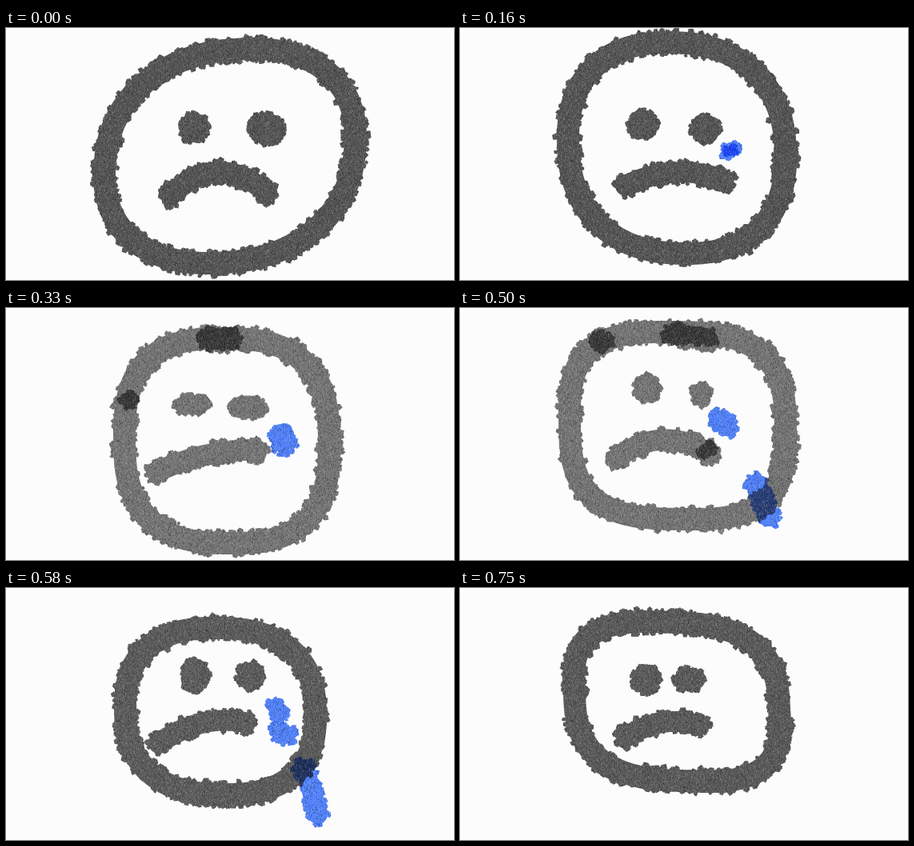
An HTML page with a canvas for the animation above (830 ms loop, 560 by 315 pixels).

```html
<!DOCTYPE html>
<html lang="en">
<head>
<meta charset="utf-8">
<title>Crying face</title>
<style>
  html, body { margin: 0; width: 100%; height: 100%; overflow: hidden; background: #fcfcfc; }
  canvas { display: block; width: 560px; height: 315px; }
</style>
</head>
<body>
<canvas id="stage" width="560" height="315"></canvas>
<script>
const W = 560, H = 315, LOOP = 830;
const BLUE = '#5082ff';

// ring: centre, radii, corner exponent, skew; eyes: centre, radii;
// mouth: both ends, bend; dabs and tears: both ends, width.
const poses = [
  { tone: [85], ring: [280, 160, 157, 134, .9, -.15], mouth: [206, 209, 327, 207, 28],
    eyes: [[235, 125, 21, 22], [326, 126, 26, 23]], dabs: [], tears: [] },
  { tone: [85], ring: [271, 150, 136, 132, .87, .07], mouth: [207, 197, 330, 190, 13],
    eyes: [[228, 121, 22, 21], [307, 127, 22, 20]], dabs: [],
    tears: [[334, 155, 343, 152, 22], [334, 155, 343, 152, 15]] },
  { tone: [118], ring: [276, 166, 128, 128, .75, .03], mouth: [188, 205, 314, 178, 8],
    eyes: [[232, 121, 26, 15], [302, 125, 27, 17]],
    dabs: [[255, 38, 281, 40, 35], [151, 114, 156, 115, 24]], tears: [[344, 158, 349, 171, 34]] },
  { tone: [118], ring: [272, 147, 135, 117, .67, .06], mouth: [197, 187, 311, 182, 20],
    eyes: [[234, 101, 19, 21], [302, 108, 15, 18]],
    dabs: [[268, 33, 308, 38, 34], [174, 40, 180, 43, 28], [305, 180, 313, 174, 20]],
    tears: [[370, 219, 388, 262, 31], [323, 140, 335, 149, 32]] },
  { tone: [92], ring: [268, 154, 119, 104, .82, .04], mouth: [191, 194, 298, 168, 12],
    eyes: [[236, 109, 20, 24], [305, 110, 20, 21]], dabs: [],
    tears: [[374, 226, 390, 284, 32], [336, 148, 343, 159, 27], [342, 180, 352, 184, 30]] },
  { tone: [90], ring: [271, 142, 129, 100, .7, .18], mouth: [208, 186, 299, 172, 11],
    eyes: [[232, 114, 21, 21], [286, 114, 22, 18]], dabs: [],
    tears: [[404, 290, 398, 294, 0]] }
];

// Start time, pose and, for a step halfway to the next drawing, that pose.
const steps = [[0, 0], [80, 0, 1], [160, 1], [330, 2], [410, 2, 3], [500, 3], [580, 4], [660, 4, 5], [750, 5]];

function halfway(a, b) {
  if (typeof a === 'number') return (a + b) / 2;
  if (Array.isArray(a)) return a.slice(0, b.length).map((v, i) => halfway(v, b[i]));
  return Object.fromEntries(Object.keys(a).map(key => [key, halfway(a[key], b[key])]));
}

function seeded(seed) {
  return () => {
    seed = (seed + 0x6D2B79F5) | 0;
    let t = Math.imul(seed ^ (seed >>> 15), 1 | seed);
    t ^= t + Math.imul(t ^ (t >>> 7), 61 | t);
    return ((t ^ (t >>> 14)) >>> 0) / 4294967296;
  };
}

function layer(w = W, h = H) {
  const c = document.createElement('canvas');
  c.width = w;
  c.height = h;
  return c.getContext('2d');
}

// Points about one pixel apart along a curve given for t from 0 to 1.
function sample(curve) {
  const out = [curve(0)];
  for (let i = 1; i <= 2000; i++) {
    const p = curve(i / 2000), q = out[out.length - 1];
    if (Math.hypot(p[0] - q[0], p[1] - q[1]) >= 1) out.push(p);
  }
  return out;
}

const power = (v, e) => Math.sign(v) * Math.abs(v) ** e;

const oval = (cx, cy, rx, ry, corner = 1, skew = 0) => sample(t => {
  const a = t * 2 * Math.PI;
  return [cx + rx * power(Math.cos(a), corner), cy + ry * power(Math.sin(a + skew), corner)];
});

const arc = (x0, y0, x1, y1, bend = 0) =>
  sample(t => [x0 + (x1 - x0) * t, y0 + (y1 - y0) * t - 4 * bend * t * (1 - t)]);

function trace(g, points, closed) {
  g.beginPath();
  points.forEach(([x, y]) => g.lineTo(x, y));
  if (closed) g.closePath();
}

// A small angular bit of the brush.
function flake(g, x, y, r, rnd) {
  const turn = rnd() * 7;
  trace(g, Array.from({ length: 5 }, (_, i) => {
    const a = turn + i * Math.PI * .4, d = r * (.7 + .4 * rnd());
    return [x + d * Math.cos(a), y + d * Math.sin(a)];
  }), true);
  g.fill();
}

// A ragged stroke on its own layer, so that only separate strokes darken each other.
function brush(target, line, width, color, rnd, { closed = false, filled = false } = {}) {
  const g = layer();
  g.lineCap = g.lineJoin = 'round';
  g.fillStyle = g.strokeStyle = color;
  g.lineWidth = Math.max(2, width - 8);
  trace(g, line, closed);
  g.stroke();
  if (filled) g.fill();
  const count = line.length + width;
  for (let i = 0; i < count * 1.2; i++) {
    const at = Math.round(rnd() * count - width / 2);
    const [x, y] = line[Math.max(0, Math.min(line.length - 1, at))];
    const a = rnd() * 2 * Math.PI, d = Math.max(0, width / 2 - 6 + rnd() * 4);
    flake(g, x + d * Math.cos(a), y + d * Math.sin(a), 2.5 + rnd() * 3, rnd);
  }
  target.drawImage(g.canvas, 0, 0);
}

function makeGrain() {
  const size = 160, g = layer(size, size), rnd = seeded(5);
  for (let i = 0; i < 16000; i++) {
    g.fillStyle = i % 2 ? 'rgba(255,255,255,.09)' : 'rgba(0,0,0,.14)';
    g.fillRect(Math.floor(rnd() * size), Math.floor(rnd() * size), 1, 1 + i % 3 / 2);
  }
  return g.canvas;
}

const grain = makeGrain();

function render([, from, to], index) {
  const pose = to ? halfway(poses[from], poses[to]) : poses[from];
  const g = layer(), rnd = seeded(index * 97 + 11);
  const grey = `rgb(${pose.tone},${pose.tone},${pose.tone})`;
  g.globalCompositeOperation = 'multiply';
  brush(g, oval(...pose.ring), 36, grey, rnd, { closed: true });
  brush(g, arc(...pose.mouth), 34, grey, rnd);
  for (const [x, y, rx, ry] of pose.eyes)
    brush(g, oval(x, y, rx - 6, ry - 6), 12, grey, rnd, { closed: true, filled: true });
  for (const [color, strokes] of [[grey, pose.dabs], [BLUE, pose.tears]])
    for (const [x0, y0, x1, y1, width] of strokes)
      if (width) brush(g, arc(x0, y0, x1, y1), width, color, rnd);
  g.globalCompositeOperation = 'source-atop';
  g.fillStyle = g.createPattern(grain, 'repeat');
  g.fillRect(0, 0, W, H);
  return g.canvas;
}

const drawings = steps.map(render);
const stage = document.getElementById('stage').getContext('2d');
const start = performance.now();

function show() {
  const time = (performance.now() - start) % LOOP;
  const current = steps.filter(s => s[0] <= time).length - 1;
  stage.fillStyle = '#fcfcfc';
  stage.fillRect(0, 0, W, H);
  stage.drawImage(drawings[current], 0, 0);
  requestAnimationFrame(show);
}
show();
</script>
</body>
</html>
```
